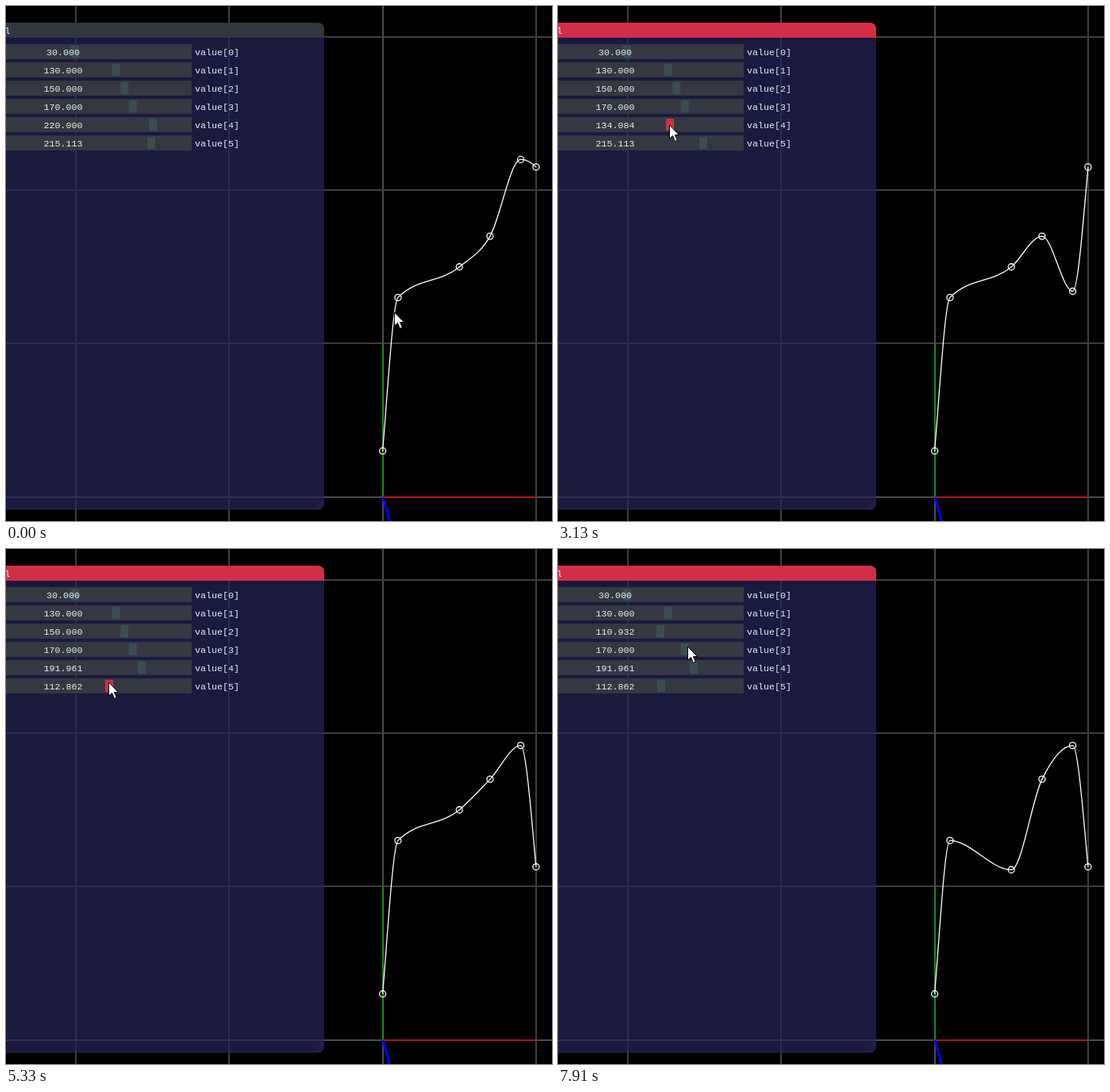
These frames come from a looping animation (688x649 px, 8000 ms). An HTML page with a canvas:

```html
<!DOCTYPE html>
<html lang="en">
<head>
<meta charset="utf-8">
<title>Curve sliders</title>
<style>
html, body { margin: 0; width: 100%; height: 100%; overflow: hidden; background: #000; }
canvas { display: block; }
</style>
</head>
<body>
<canvas id="stage" width="688" height="649"></canvas>
<script>
const ctx = document.getElementById('stage').getContext('2d');
const LOOP = 8000, BEAT = 117.5;
const UNIT = 193.3, OX = 474.6, OY = 618.7;
const RED = '#d22e48';
const knots = [0, 0.1, 0.5, 0.7, 0.9, 1];
const start = [30, 130, 150, 170, 220, 215.113];

// Pointer path: beat, x, y
const path = [
  [0, 490, 386], [1, 494, 388], [2, 423, 373], [8, 195, 186], [10, 181, 157],
  [14, 181, 150], [18, 165, 150], [23, 137, 150], [26, 141, 150],
  [31, 171, 150], [33, 171, 150], [35, 150, 168], [38, 119, 168],
  [41, 109, 168], [45, 130, 168], [46, 130, 168], [50, 149, 112],
  [54, 148, 107], [61, 106, 107], [65, 129, 107], [67, 164, 123]
];

// Dragging the slider moves its value with the pointer
const drags = [
  { slider: 4, press: 14, release: 33 },
  { slider: 5, press: 34, release: 46 },
  { slider: 2, press: 51, release: 65 }
];

const valueAt = x => (x - 71.5) * 600 / 311;
const knobAt = value => 71.5 + value * 311 / 600;

function pointer(beat) {
  const i = path.findIndex(p => p[0] > beat);
  if (i < 0) return path[path.length - 1].slice(1);
  const [b0, x0, y0] = path[i - 1], [b1, x1, y1] = path[i];
  const k = (beat - b0) / (b1 - b0);
  return [Math.round(x0 + (x1 - x0) * k), Math.round(y0 + (y1 - y0) * k)];
}

function rect(x, y, w, h, color, radii = 0) {
  ctx.fillStyle = color;
  ctx.beginPath();
  ctx.roundRect(x, y, w, h, radii);
  ctx.fill();
}

function line(x0, y0, x1, y1, color, width) {
  ctx.strokeStyle = color;
  ctx.lineWidth = width;
  ctx.beginPath();
  ctx.moveTo(x0, y0);
  ctx.lineTo(x1, y1);
  ctx.stroke();
}

function text(str, x, y, align = 'left') {
  ctx.fillStyle = '#e4efea';
  ctx.textAlign = align;
  ctx.fillText(str, x, y);
}

function drawGrid() {
  for (let i = 0; i < 4; i++) {
    const x = Math.round(OX + (i - 2) * UNIT), y = Math.round(OY - i * UNIT);
    line(x, 0, x, 649, i === 2 ? '#4c4c4c' : '#3e3e3e', 2);
    line(0, y, 688, y, i === 0 ? '#4c4c4c' : '#3e3e3e', 2);
  }
  line(475, 619 - UNIT, 475, 619, '#129012', 2);
  line(475, 619, 475 + UNIT, 619, '#b41414', 2);
  line(475, 619, 484, 651, '#0000ff', 3);
}

// Steffen's monotone cubic slopes
function slopes(v) {
  const h = knots.slice(1).map((x, i) => x - knots[i]);
  const d = h.map((w, i) => (v[i + 1] - v[i]) / w);
  const end = (i, j) => {
    const k = h[i] / (h[i] + h[j]);
    const p = d[i] * (1 + k) - d[j] * k;
    if (p * d[i] <= 0) return 0;
    return Math.abs(p) > 2 * Math.abs(d[i]) ? 2 * d[i] : p;
  };
  const last = d.length - 1;
  return v.map((_, i) => {
    if (i === 0) return end(0, 1);
    if (i > last) return end(last, last - 1);
    const a = d[i - 1], b = d[i];
    if (a * b <= 0) return 0;
    const p = (a * h[i] + b * h[i - 1]) / (h[i - 1] + h[i]);
    return Math.sign(a) * Math.min(2 * Math.abs(a), 2 * Math.abs(b), Math.abs(p));
  });
}

function drawCurve(v) {
  const m = slopes(v);
  const px = x => OX + x * UNIT, py = y => OY - y * UNIT / 100;
  ctx.strokeStyle = '#fff';
  ctx.lineWidth = 1.3;
  ctx.beginPath();
  ctx.moveTo(px(knots[0]), py(v[0]));
  for (let i = 1; i < v.length; i++) {
    const x0 = knots[i - 1], x1 = knots[i], h = (x1 - x0) / 3;
    ctx.bezierCurveTo(px(x0 + h), py(v[i - 1] + m[i - 1] * h),
      px(x1 - h), py(v[i] - m[i] * h), px(x1), py(v[i]));
  }
  ctx.stroke();
  knots.forEach((x, i) => {
    ctx.beginPath();
    ctx.arc(px(x), py(v[i]), 4, 0, 7);
    ctx.stroke();
  });
}

function drawPanel(v, active, focused) {
  rect(-20, 21, 421, 614, 'rgba(38,38,91,.7)', 8);
  rect(-20, 21, 421, 19, focused ? RED : '#32363f', [8, 8, 0, 0]);
  ctx.fillStyle = 'rgba(120,196,212,.04)';
  ctx.beginPath();
  ctx.moveTo(385, 635);
  ctx.lineTo(401, 619);
  ctx.arcTo(401, 635, 385, 635, 8);
  ctx.fill();
  text('l', -1.5, 35);
  v.forEach((value, i) => {
    const y = 48 + 23 * i;
    rect(-91, y, 325, 19, '#343841');
    rect(knobAt(value) - 5, y + 2, 10, 15, i === active ? RED : '#3c4c56');
    text(value.toFixed(3), 72, y + 14, 'center');
    text(`value[${i}]`, 238, y + 14);
  });
}

function drawPointer(x, y) {
  const shape = [[0, 0], [0, 17], [4, 13.5], [7, 20.5], [9.8, 19.3], [7, 12.5], [12, 12.5]];
  ctx.beginPath();
  shape.forEach(([dx, dy]) => ctx.lineTo(x + dx, y + dy));
  ctx.closePath();
  ctx.fillStyle = '#fff';
  ctx.fill();
  ctx.strokeStyle = '#000';
  ctx.lineWidth = 1;
  ctx.stroke();
}

function draw(now) {
  const beat = Math.max(0, Math.floor((now % LOOP - 10) / BEAT));
  const values = start.slice();
  let active = -1;
  for (const { slider, press, release } of drags) {
    if (beat < press) continue;
    values[slider] = valueAt(pointer(Math.min(beat, release))[0]);
    if (beat < release) active = slider;
  }
  ctx.fillStyle = '#000';
  ctx.fillRect(0, 0, 688, 649);
  ctx.font = '11.667px "Liberation Mono", monospace';
  drawGrid();
  drawCurve(values);
  drawPanel(values, active, beat >= drags[0].press);
  const [x, y] = pointer(beat);
  drawPointer(x - 0.5, y);
}

const begin = performance.now();
function loop() {
  draw(performance.now() - begin);
  requestAnimationFrame(loop);
}
loop();
</script>
</body>
</html>
```
